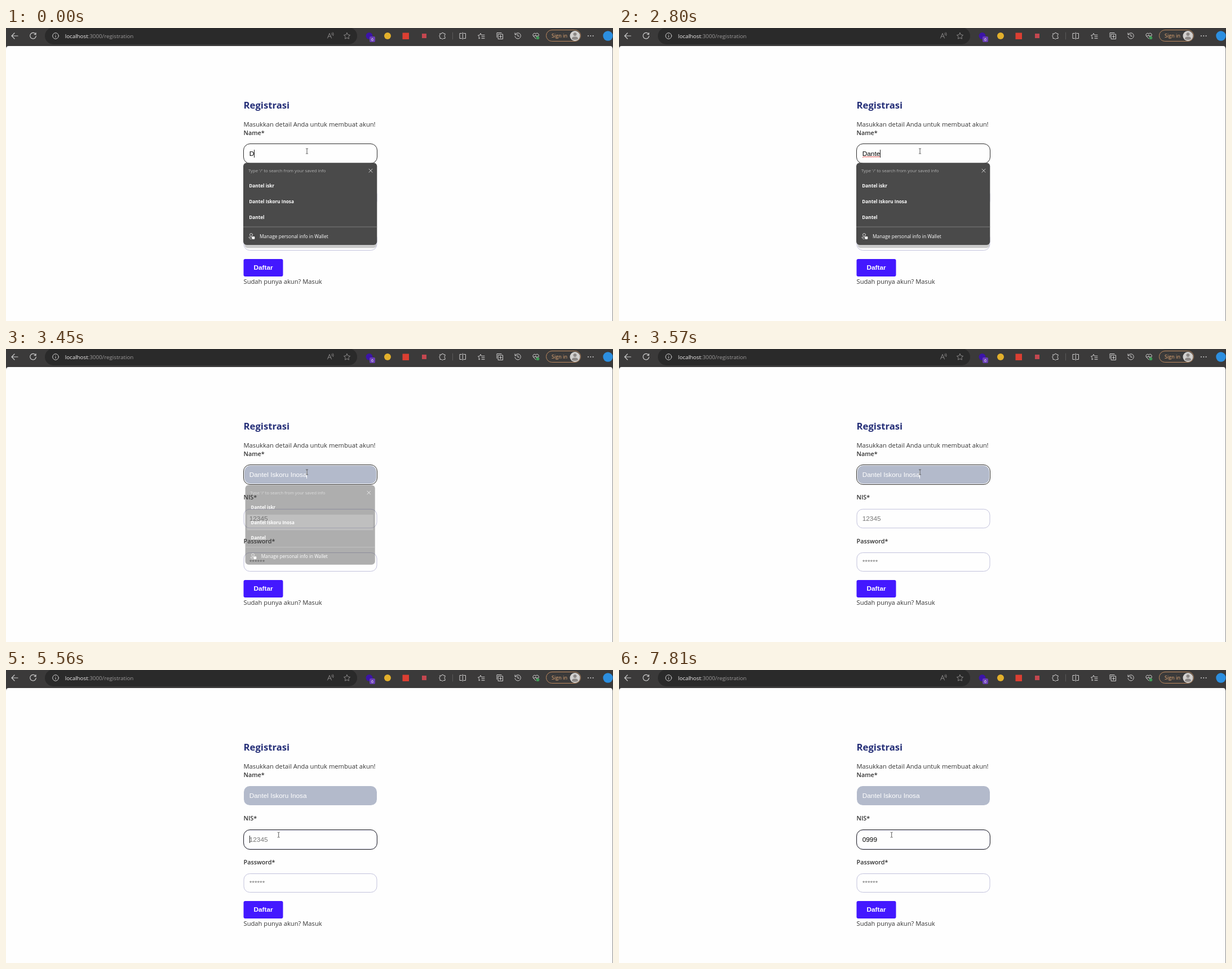
Animation, 1077 px wide and 520 px high, one loop 8 s. Source, as an HTML page:

```html
<!DOCTYPE html>
<html lang="id">
<head>
<meta charset="utf-8">
<title>Registrasi</title>
<style>
  html, body { margin: 0; width: 100%; height: 100%; overflow: hidden; background: #fefefe; }
  svg { display: block; }
  text { font-family: "Open Sans", "Noto Sans", sans-serif; white-space: pre; }
  .body { font-size: 11.2px; fill: #353535; }
  .label { font-size: 10.8px; font-weight: 600; fill: #303030; }
  .input { font: 11.84px "Liberation Sans", Arial, sans-serif; }
  .hint { fill: #757575; }
  .item { font-size: 8.2px; font-weight: 700; fill: #fff; }
  .icon { fill: none; stroke: #d0cfcf; stroke-width: 1; stroke-linecap: round; stroke-linejoin: round; }
  .dim { stroke: #8a8888; }
</style>
</head>
<body>
<svg width="1077" height="520" viewBox="0 0 1077 520">
  <!-- browser bar -->
  <rect width="1077" height="520" fill="#3b3a3a"/>
  <rect x="1076" y="36" width="1" height="484" fill="#8c8c8c"/>
  <path d="M0 520V37Q0 32 5 32H1072Q1076 32 1076 36V520Z" fill="#fefefe"/>
  <rect x="69" y="-1" width="554" height="30" rx="15" fill="#2a2a2a"/>
  <g class="icon">
    <path d="M21 14H10M15 9L10 14L15 19" stroke-width="1.2"/>
    <path d="M52.7 11.2A5.3 5.3 0 1 0 53.3 14M53 8.5V11.5H50" stroke-width="1.2"/>
    <circle cx="88" cy="14" r="5.3"/><path d="M88 13.5V16.5M88 11.3V11.4"/>
    <path class="dim" d="M570.5 18L574 9.5L577.5 18M571.8 15H576.2M578 9Q579.4 10.5 578.4 12.5M580 8Q582 10.5 580.6 13.5"/>
    <path class="dim" d="M605 8.5L606.7 12L610.6 12.6L607.8 15.3L608.4 19.2L605 17.4L601.6 19.2L602.2 15.3L599.4 12.6L603.3 12Z"/>
    <path d="M770 10H773A1.7 1.7 0 0 1 776.4 10H779V12.5A1.7 1.7 0 0 0 779 15.7V18.5H776A1.7 1.7 0 0 1 772.8 18.5H770V15.7A1.7 1.7 0 0 1 770 12.5Z"/>
    <path d="M792.5 8V20" stroke="#5a5959"/>
    <path d="M808.5 9.5H805V18.5H808.5M812 9.5H815.5V18.5H812M810.3 8V20"/>
    <path d="M841 18L839 19L839.5 15.5L837.5 13L840.5 12.5L842 9.5L843.5 12.5H849M844 15.5H849M844 18.5H849"/>
    <path d="M873.5 11H881.5V19.5H873.5ZM871 16.5V8.5H879M877.5 13V17.5M875.3 15.3H879.8"/>
    <path d="M903.5 11.5A5.2 5.2 0 1 1 903 14.8M903 8.8V11.8H906M908 11V14.5H910.5"/>
    <path d="M940 19L935.8 14.6A3 3 0 0 1 940 10.2A3 3 0 0 1 944.6 14.4M936 14H938.5L939.8 12L941.2 15.5L942 14H944"/>
    <rect x="958.5" y="3.5" width="61" height="20" rx="10" stroke="#bd8a60"/>
  </g>
  <circle cx="943.5" cy="17.5" r="2.8" fill="#3f9a56"/>
  <g fill="#d0cfcf"><circle cx="1033" cy="14" r="1"/><circle cx="1037.3" cy="14" r="1"/><circle cx="1041.6" cy="14" r="1"/></g>
  <circle cx="644.5" cy="14" r="6" fill="#3c14a8"/>
  <rect x="645" y="15" width="10" height="10" rx="2" fill="#6a3fb5"/>
  <text x="648" y="22.7" font-size="7" fill="#fff">6</text>
  <circle cx="677" cy="14" r="6" fill="#e3b02c"/>
  <rect x="703.5" y="8.5" width="11.5" height="11.5" fill="#dc3f32"/>
  <rect x="738" y="10" width="8" height="8" fill="#c4474f"/>
  <circle cx="1068" cy="14" r="8.7" fill="#2c8fe0"/>
  <circle cx="1009.5" cy="14" r="9" fill="#d2d0ce"/>
  <g fill="#8d8987"><circle cx="1009.5" cy="11" r="3"/><path d="M1004 19.5Q1004 15.3 1009.5 15.3T1015 19.5Q1009.5 22.5 1004 19.5Z"/></g>
  <text x="104.7" y="17.5" font-size="9.77" fill="#9c9a9a"><tspan fill="#f2f0f0">localhost</tspan>:3000/registration</text>
  <text x="968" y="17.2" font-size="9.06" fill="#e9ad78">Sign in</text>

  <!-- form -->
  <text x="421.5" y="143" font-size="16.7" font-weight="700" fill="#252f78">Registrasi</text>
  <text class="body" x="421.5" y="175">Masukkan detail Anda untuk membuat akun!</text>
  <text class="label" x="421.5" y="190">Name*</text>
  <text class="label" x="421.5" y="267">NIS*</text>
  <text class="label" x="421.5" y="345">Password*</text>
  <rect id="nameBox" rx="10.5"/>
  <g fill="#fefefe" stroke="#c2c2dc">
    <rect x="422" y="284.3" width="236" height="33.4" rx="10.5"/>
    <rect x="422" y="361.5" width="236" height="33" rx="10.5"/>
  </g>
  <rect id="ring" x="421.5" width="237" height="35" rx="11.5" fill="none" stroke="#2c2c2c"/>
  <text id="name" class="input" x="431.7" y="227"></text>
  <text id="nis" class="input" x="431.7" y="305"></text>
  <text class="input hint" x="431.7" y="382">******</text>
  <path id="squiggle" fill="none" stroke="#e0302c" stroke-width=".9"/>
  <rect x="421.5" y="410" width="70" height="31" rx="3" fill="#4318ff"/>
  <text class="input" x="439.5" y="429.2" style="font-weight:700" fill="#fff">Daftar</text>
  <text class="body" x="421.5" y="453.5">Sudah punya akun? Masuk</text>

  <!-- suggestions -->
  <rect id="shade" x="423.5" y="378" width="233.5" height="12.5" rx="5" fill="#c9c9c9"/>
  <g id="menu">
    <rect x="421" y="239.3" width="237.3" height="145.7" rx="6" fill="#4a4a4a"/>
    <rect id="row" x="424.3" width="230.7" height="28.4" fill="#717171"/>
    <text x="430" y="256" font-size="7.74" fill="#b3b3b3">Type '/' to search from your saved info</text>
    <path class="icon" d="M644 250.2L650 256.2M650 250.2L644 256.2"/>
    <text class="item" x="431.3" y="282.8">Dantel iskr</text>
    <text class="item" x="431.3" y="310.8">Dantel Iskoru Inosa</text>
    <text class="item" x="431.3" y="339">Dantel</text>
    <path d="M421 353H658.3" stroke="#7c7c7c"/>
    <g class="icon" stroke="#fff"><circle cx="435" cy="367" r="2.5"/><path d="M435 374.5Q431 374 431 371.2H436"/></g>
    <rect x="436.3" y="370" width="5" height="4.8" rx="1" fill="#fff"/>
    <text x="450" y="373" font-size="8.45" fill="#fff">Manage personal info in Wallet</text>
  </g>

  <rect id="caret" width="1"/>
  <path id="beam" d="M-2 -4.5H-.7L0 -4L.7 -4.5H2M0 -4V4M-2 4.5H-.7L0 4L.7 4.5H2" fill="none" stroke="#444" stroke-width=".9"/>
  <path id="arrow" d="M.5 .5V9.5L2.6 7.6L4 10.7L5.4 10L4 7.1H6.8Z" fill="#fff" stroke="#111" stroke-width=".8"/>
</svg>
<script>
const LOOP = 8000, FULL = 'Dantel Iskoru Inosa';
const $ = id => document.getElementById(id);
const set = (id, attrs) => { for (const k in attrs) $(id).setAttribute(k, attrs[k]); };
const show = (id, on) => set(id, { visibility: on ? 'visible' : 'hidden' });

// Each step changes part of the state from its time on; caret 0 means hidden.
const steps = [
  [0, { name: 'D', nis: '', caret: 440, menu: 1, row: 0, filled: false, misspelt: false, field: 0, beam: true, at: [534, 218.5] }],
  [280, { caret: 0 }],
  [860, { caret: 440 }],
  [1170, { name: 'Da', caret: 446 }],
  [1430, { name: 'Dan', caret: 453 }],
  [1580, { name: 'Dante', caret: 463 }],
  [2130, { caret: 0 }],
  [2650, { caret: 463 }],
  [2800, { misspelt: true }],
  [2930, { name: 'Dantel iskr', filled: true, misspelt: false, row: 1, caret: 0 }],
  [3050, { name: FULL, row: 2 }],
  [3450, { menu: .44, caret: 533 }],
  [3570, { menu: 0 }],
  [3870, { at: [443, 235] }],
  [4000, { at: [461, 250], beam: false, caret: 0 }],
  [4150, { at: [470, 270] }],
  [4270, { at: [482.5, 289], beam: true }],
  [4420, { at: [483.7, 292.5], field: 1, caret: 432 }],
  [4980, { caret: 0 }],
  [5560, { caret: 432 }],
  [5980, { caret: 0 }],
  [6400, { nis: '0', caret: 438 }],
  [6860, { nis: '09', caret: 444 }],
  [6980, { nis: '099', caret: 451 }],
  [7400, { nis: '0999', caret: 458 }],
  [7810, { caret: 0 }]
];

let wave = 'M432 229.3';
for (let x = 433.5, up = 1; x < 464; x += 1.5, up = -up) wave += `L${x} ${228.6 + up * .7}`;
set('squiggle', { d: wave });

function render(t) {
  const s = Object.assign({}, ...steps.filter(p => p[0] <= t).map(p => p[1]));
  const inset = s.field ? 0 : 1;  // the focus ring leaves a thin gap around the fill
  set('nameBox', {
    x: 422 + inset, y: 206 + inset, width: 236 - 2 * inset, height: 34 - 2 * inset,
    fill: s.filled ? '#b3bacb' : '#fefefe'
  });
  set('ring', { y: s.field ? 283.5 : 205.5 });

  $('name').textContent = s.name;
  set('name', { fill: s.filled ? '#fff' : '#000' });
  $('nis').textContent = s.nis || '12345';
  set('nis', { fill: s.nis ? '#000' : '#757575' });
  show('squiggle', s.misspelt);

  show('shade', s.menu === 1);
  show('menu', s.menu);
  show('row', s.menu && s.row);
  set('row', { y: 265 + 28.4 * (s.row - 1) });
  const scale = s.menu < 1 ? .97 : 1;
  set('menu', { opacity: s.menu, transform: `translate(539.6 312.2) scale(${scale}) translate(-539.6 -312.2)` });

  show('caret', s.caret);
  set('caret', {
    x: s.caret, y: s.field ? 294 : 216, height: s.field ? 13 : 14,
    fill: s.filled && !s.field ? '#fff' : '#222'
  });
  show('beam', s.beam);
  show('arrow', !s.beam);
  set(s.beam ? 'beam' : 'arrow', { transform: `translate(${s.at})` });
}

function tick() {
  render(performance.now() % LOOP);
  requestAnimationFrame(tick);
}
tick();
</script>
</body>
</html>
```
